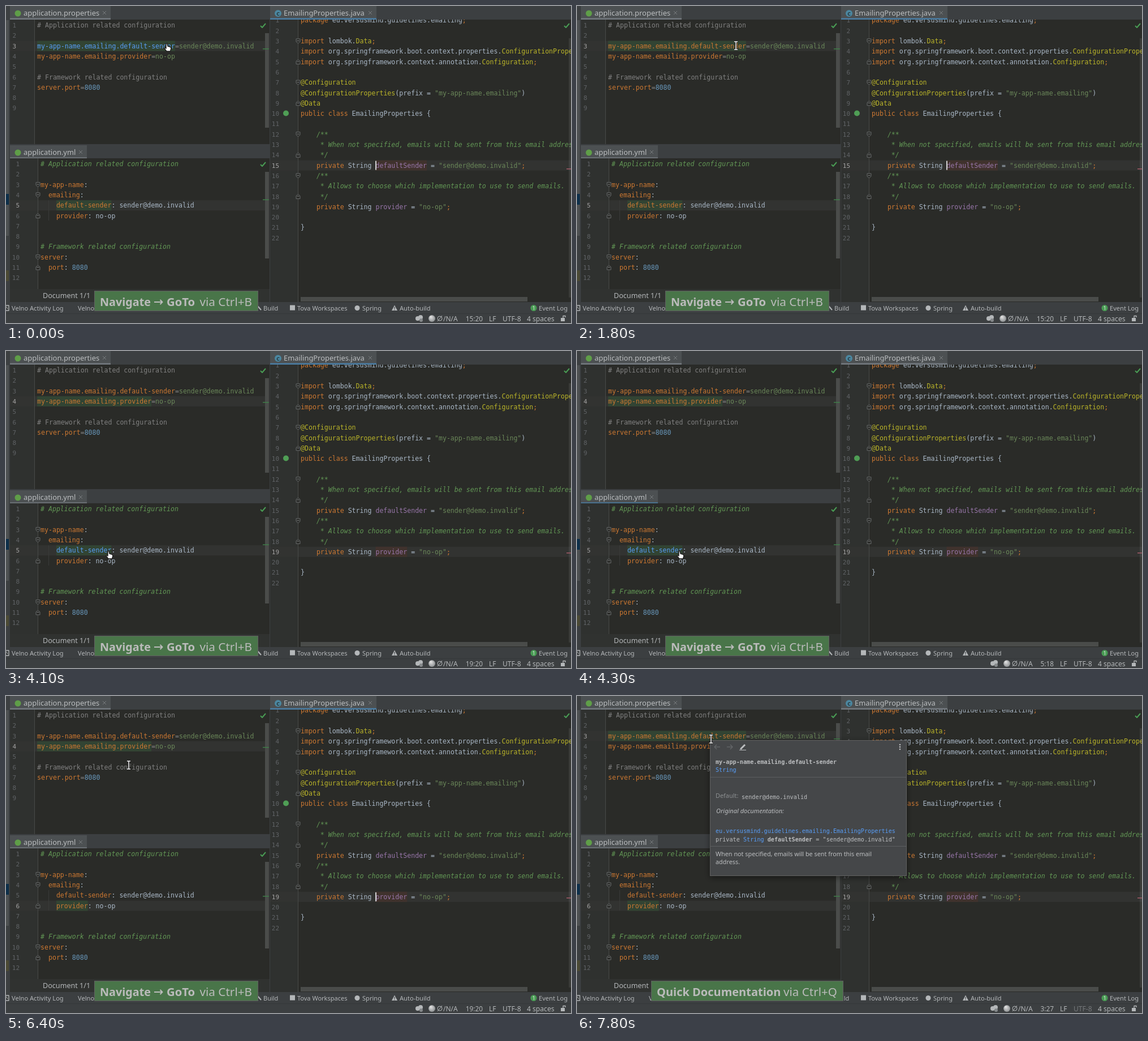
These frames come from a looping animation (999x560 px, 8 s). An HTML page with a canvas:

```html
<!DOCTYPE html>
<html lang="en">
<head>
<meta charset="utf-8">
<title>Navigating between configuration and code</title>
<style>
html, body { margin: 0; width: 100%; height: 100%; overflow: hidden; background: #3c3f41; }
canvas { display: block; width: 999px; height: 560px; }
</style>
</head>
<body>
<canvas id="stage" width="999" height="560"></canvas>
<script>
const ctx = document.getElementById('stage').getContext('2d');
const LOOP = 8000, CHAR = 6.97, ROW = 18.3;
const MONO = '"DejaVu Sans Mono", monospace', SANS = '"Noto Sans", "Open Sans", sans-serif';
const MAIL = 'sender@demo.invalid';
const COLORS = {
  o: '#cc7832', w: '#a9b7c6', c: '#808080', d: '#629755', s: '#6a8759',
  n: '#6897bb', f: '#9876aa', a: '#bbb529', l: '#589df6'
};

// Each line is a list of "color:text" runs joined by "~".
const panes = {
  top: {
    x: 55, y: 34, left: 7, right: 458, clip: [7, 24, 459, 220], gutter: 50, numbers: 18,
    lines: ['c:# Application related configuration', '',
      'o:my-app-name.emailing.default-sender~c:=~s:' + MAIL,
      'o:my-app-name.emailing.provider~c:=~s:no-op', '',
      'c:# Framework related configuration', 'o:server.port~c:=~n:8080', '', '']
  },
  yml: {
    x: 61, y: 279, left: 7, right: 458, clip: [7, 269, 459, 231], gutter: 56, numbers: 24,
    open: [3, 4, 10], close: [6, 11],
    lines: ['d:# Application related configuration', '', 'o:my-app-name~w::',
      'o:  emailing~w::', 'o:    default-sender~w:: ' + MAIL,
      'o:    provider~w:: no-op', '', '', 'd:# Framework related configuration',
      'o:server~w::', 'o:  port~w:: ~n:8080', '']
  },
  java: {
    x: 521, y: 25.4, left: 467, right: 999, clip: [467, 24, 532, 499], gutter: 516, numbers: 483,
    open: [3, 7, 12, 16], close: [5, 9, 14, 18],
    lines: ['o:package ~w:eu.versusmind.guidelines.emailing~o:;', '',
      'o:import ~w:lombok.~a:Data~o:;',
      'o:import ~w:org.springframework.boot.context.properties.~a:ConfigurationProperties~o:;',
      'o:import ~w:org.springframework.context.annotation.~a:Configuration~o:;', '',
      'a:@Configuration',
      'a:@ConfigurationProperties~w:(prefix = ~s:"my-app-name.emailing"~w:)',
      'a:@Data', 'o:public class ~w:EmailingProperties {', '',
      'd:    /**', 'd:     * When not specified, emails will be sent from this email address.', 'd:     */',
      'o:    private ~w:String ~f:defaultSender~w: = ~s:"' + MAIL + '"~o:;',
      'd:    /**', 'd:     * Allows to choose which implementation to use to send emails.', 'd:     */',
      'o:    private ~w:String ~f:provider~w: = ~s:"no-op"~o:;', '', 'w:}', '']
  }
};

// Pointer hot spot: time, x, y.
const POINTER = [
  [0, 284, 66], [400, 284, 66], [900, 283, 67], [1500, 283, 67], [1800, 281, 70], [2300, 281, 70],
  [2800, 225, 92], [3600, 225, 92], [4000, 181, 353], [4600, 181, 353], [5100, 116, 383],
  [5300, 116, 383], [5500, 116, 372], [6000, 116, 372], [6400, 217, 122], [6500, 228, 100],
  [6600, 228, 100], [6800, 237, 76], [8000, 237, 76]
];
const CARET_ON = [[0, 500], [1100, 1600], [1800, 2400], [3000, 3300], [3700, 4000],
  [4400, 4900], [5100, 5400], [6000, 6500]];
const TOP_LINK = [[0, 900], [1200, 1700]];

const during = (t, spans) => spans.some(([a, b]) => t >= a && t < b);
const latest = (t, steps) => steps.filter(([at]) => at <= t).pop()[1];
const smooth = u => u * u * (3 - 2 * u);

function pointerAt(t) {
  const i = POINTER.findIndex(k => k[0] > t);
  const [ta, xa, ya] = POINTER[i - 1], [tb, xb, yb] = POINTER[i];
  const u = smooth((t - ta) / (tb - ta));
  return [xa + (xb - xa) * u, ya + (yb - ya) * u];
}

function box(x, y, w, h, color) {
  ctx.fillStyle = color;
  ctx.fillRect(x, y, w, h);
}

function text(str, x, y, size, color, style = '', family = SANS, align = 'left') {
  ctx.font = `${style} ${size}px ${family}`;
  ctx.textAlign = align;
  ctx.fillStyle = color;
  ctx.fillText(str, x, y);
}

function path(points, stroke, width = 1, fill, close) {
  ctx.beginPath();
  points.forEach(([x, y]) => ctx.lineTo(x, y));
  if (close) ctx.closePath();
  if (fill) { ctx.fillStyle = fill; ctx.fill(); }
  if (stroke) { ctx.strokeStyle = stroke; ctx.lineWidth = width; ctx.stroke(); }
}

function disc(x, y, r, color) {
  ctx.beginPath();
  ctx.arc(x, y, r, 0, 7);
  ctx.fillStyle = color;
  ctx.fill();
}

const rowY = (pane, line) => pane.y + (line - 1) * ROW;

function codeLine(pane, line, linked) {
  let x = pane.x;
  for (const run of pane.lines[line - 1].split('~')) {
    const key = run[0], str = run.slice(2);
    const color = COLORS[linked && key === 'o' ? 'l' : key];
    text(str, x, rowY(pane, line) + 4, 11.58, color, key === 'd' ? 'italic' : '', MONO);
    x += str.length * CHAR;
  }
}

function foldMark(x, y, up) {
  const s = up ? -1 : 1;
  path([[x - 3.5, y - 4 * s], [x + 3.5, y - 4 * s], [x + 3.5, y + s], [x, y + 4 * s], [x - 3.5, y + s]],
    '#676a6a', 1, '#2a2b29', true);
  box(x - 2, y - 1, 4, 1, '#7b7e7e');
}

function drawPane(pane, current, mark, link) {
  const [cx, cy, cw, ch] = pane.clip;
  ctx.save();
  ctx.beginPath();
  ctx.rect(cx, cy, cw, ch);
  ctx.clip();
  box(cx, cy, cw, ch, '#2a2b28');
  box(cx, cy, pane.gutter - cx, ch, '#2f312f');
  box(pane.left, rowY(pane, current) - 9, pane.right - pane.left, 18, '#323331');
  box(pane.gutter, cy, 1, ch, '#484a48');
  const [line, col, length, color] = mark;
  box(pane.x + col * CHAR, rowY(pane, line) - 9, length * CHAR, 18, color);
  pane.lines.forEach((str, i) => {
    const n = i + 1;
    text(n, pane.numbers, rowY(pane, n) + 4, 11, n === current ? '#a4a3a3' : '#606366', '', MONO, 'right');
    if (str) codeLine(pane, n, link === n);
  });
  (pane.open || []).forEach(n => foldMark(pane.gutter + .5, rowY(pane, n)));
  (pane.close || []).forEach(n => foldMark(pane.gutter + .5, rowY(pane, n), true));
  ctx.restore();
}

function tab(x, y, w, label, focused, size = 13) {
  box(x, y, w, 24, '#4c5052');
  box(x, y + 21.5, w, 2.5, focused ? '#4a7ea5' : '#747a80');
  text(label, x + 24, y + 17, size, '#bbbec0');
  const cx = x + w - 11, cy = y + 12;
  path([[cx - 3, cy - 3], [cx + 3, cy + 3]], '#777b7d');
  path([[cx + 3, cy - 3], [cx - 3, cy + 3]], '#777b7d');
}

const tick = (x, y) => path([[x - 4, y], [x - 1, y + 3], [x + 5, y - 4]], '#499c54', 2);

function chrome(s) {
  box(0, 0, 999, 560, '#3c3f41');
  box(0, 25, 5, 381, '#4d5051');
  box(0, 332, 5, 19, '#0d2f4a');
  box(0, 467, 5, 19, '#4b4a34');
  tab(7, 0, 178, 'application.properties', s.focus === 'top');
  tab(7, 246, 136, 'application.yml', s.focus === 'yml', 12.9);
  tab(467, 0, 188, 'EmailingProperties.java', s.focus === 'java', 12.9);
  disc(21, 13, 5.5, '#5f9e48');
  disc(21, 259, 5.5, '#5f9e48');
  disc(481, 13, 6, '#4b87a0');
  text('C', 481, 16.5, 9, '#263238', 'bold', SANS, 'center');
}

function editors(s) {
  const green = '#324433';
  drawPane(panes.top, s.topLine, s.topMark === 3 ? [3, 0, 35, green] : [4, 0, 29, green], s.topLink);
  drawPane(panes.yml, s.ymlLine, s.ymlMark === 5 ? [5, 4, 14, green] : [6, 4, 8, green], s.ymlLink);
  drawPane(panes.java, s.javaLine, [s.javaMark, 19, s.javaMark === 15 ? 13 : 8, '#40322d'], 0);
  box(75, 343, 1, 36, '#393b39');
  disc(495, 189.5, 5, '#4f9e55');

  box(458, 48, 7, 167, '#4a4c4a');
  box(458, 293, 7, 153, '#4a4c4a');
  box(995, 57, 4, 458, 'rgba(255,255,255,.07)');
  box(521, 514, 401, 8, '#4a4c4a');
  box(454, s.topMark === 3 ? 75 : 90, 11, 1.5, '#3f7d48');
  box(454, s.ymlMark === 5 ? 341.5 : 353, 11, 1.5, '#3f7d48');
  box(991, s.javaMark === 15 ? 287 : 356, 8, 1.5, '#a45b68');
  tick(454, 35);
  tick(454, 280);
  tick(991, 35);
  if (s.caret) box(653, rowY(panes.java, s.javaLine) - 8, 2, 16, '#d0d0d0');
  if (s.focus === 'top' && s.t >= 7000) box(236, 63, 1.5, 16, '#c8c8c8');
}

function footer(s) {
  const ink = '#b4b7b9';
  box(7, 500, 459, 23, '#303230');
  box(0, 523, 999, 37, '#3c3f41');
  box(0, 543, 999, 1, '#343739');
  text('Document 1/1', 65, 516, 12.6, ink);
  text('Velno Activity Log', 10, 537.5, 11.1, ink);
  text('Velno', 127, 537.5, 11.1, ink);
  path([[0, 529], [5, 529], [5, 538], [0, 538]], ink, 1.3);
  path([[0, 531], [3, 535]], ink);
  path([[445, 530], [451, 537]], ink, 2);
  text('Build', 455, 537.5, 11, ink);
  box(502, 528.5, 9, 9, ink);
  text('Tova Workspaces', 515, 537.5, 11, ink);
  disc(621, 533.5, 4.5, ink);
  text('Spring', 630, 537.5, 11.1, ink);
  path([[687, 528.5], [692, 538], [682, 538]], null, 1, ink, true);
  box(686.4, 531.5, 1.2, 3.5, '#3c3f41');
  box(686.4, 536, 1.2, 1.2, '#3c3f41');
  text('Auto-build', 696, 537.5, 11.1, ink);
  disc(933, 533.5, 5.5, '#499c54');
  text('1', 933, 537, 9, '#eeeeee', '', SANS, 'center');
  text('Event Log', 942, 537.5, 11.1, ink);

  const shift = s.status.length < 5 ? 7 : 0;
  disc(728 + shift, 552, 4, ink);
  disc(733 + shift, 550, 4, ink);
  disc(734 + shift, 555, 3, '#85898b');
  const ball = ctx.createRadialGradient(751 + shift, 549, 1, 753 + shift, 552, 6);
  ball.addColorStop(0, '#dedede');
  ball.addColorStop(1, '#8f9294');
  disc(753 + shift, 552, 6, ball);
  ctx.beginPath();
  ctx.arc(767 + shift, 552, 4, 0, 7);
  ctx.strokeStyle = ink;
  ctx.lineWidth = 1;
  ctx.stroke();
  path([[763 + shift, 557], [771 + shift, 547]], ink);
  text('/N/A', 773 + shift, 556.5, 12, ink);
  text(s.status, 843, 556.5, 11.8, ink, '', SANS, 'right');
  text('LF', 854, 556.5, 12, ink);
  text('UTF-8', 878, 556.5, 12.1, s.focus === 'top' || s.doc ? '#777a7c' : ink);
  text('4 spaces', 921, 556.5, 12.1, ink);
  box(981, 551, 7, 6, ink);
  path([[985, 551], [985, 547.5], [989, 547.5], [989, 550]], ink, 1.3);
}

function banner(s) {
  const ink = '#bbbbbb', x = s.doc ? 131 : 156, w = s.doc ? 340 : 290;
  box(x, 503, w, 36, '#616161');
  box(x + 1, 504, w - 2, 34, '#497549');
  if (s.doc) {
    text('Quick Documentation', 141, 529.5, 20, ink, 'bold');
    text('via Ctrl+Q', 365, 529.5, 20.6, ink);
  } else {
    text('Navigate', 166, 529.5, 19.8, ink, 'bold');
    path([[262, 523], [277, 523]], ink, 2);
    path([[272.5, 519], [276.5, 523], [272.5, 527]], ink, 2);
    text('GoTo', 284, 529.5, 20.3, ink, 'bold');
    text('via Ctrl+B', 342.5, 529.5, 20.7, ink);
  }
}

function docPopup() {
  const ink = '#bcbec0', mono = (str, x, y, color, style) => text(str, x, y, 10.16, color, style, MONO);
  ctx.save();
  ctx.shadowColor = 'rgba(0,0,0,.45)';
  ctx.shadowBlur = 10;
  ctx.shadowOffsetY = 3;
  box(235, 78, 348, 240, '#616161');
  ctx.restore();
  box(236, 79, 346, 238, '#454749');
  path([[247, 86], [243, 90], [247, 94]], '#65686a', 1.3);
  path([[243, 90], [253, 90]], '#65686a', 1.3);
  path([[271, 86], [275, 90], [271, 94]], '#65686a', 1.3);
  path([[265, 90], [275, 90]], '#65686a', 1.3);
  path([[289, 94], [297, 86]], ink, 3);
  box(287, 95, 12, 1, ink);
  [86, 90, 94].forEach(y => disc(571, y, 1.3, ink));
  mono('my-app-name.emailing.default-sender', 245, 120, ink, 'bold');
  mono('String', 245, 134, COLORS.l);
  box(236, 143, 346, 1, '#5b5e60');
  text('Default:', 245, 179.5, 10.9, '#8c8f91');
  mono(MAIL, 291, 182, ink);
  text('Original documentation:', 246, 206.5, 11, ink, 'italic');
  mono('eu.versusmind.guidelines.emailing.EmailingProperties', 245, 242, COLORS.l);
  const step = 6.115;
  mono('private', 245, 256.5, ink);
  mono('String', 245 + 8 * step, 256.5, COLORS.l);
  mono('defaultSender', 245 + 15 * step, 256.5, ink, 'bold');
  mono('= "' + MAIL + '"', 245 + 29 * step, 256.5, ink);
  box(236, 265, 346, 1, '#5b5e60');
  text('When not specified, emails will be sent from this email', 245, 283, 10.83, ink);
  text('address.', 245, 297, 10.83, ink);
}

function handCursor(x, y) {
  ctx.lineJoin = 'round';
  path([[x - 1, y], [x + 1, y], [x + 2, y + 5], [x + 7, y + 6.5], [x + 8, y + 9], [x + 6.5, y + 14],
    [x, y + 14], [x - 4, y + 9], [x - 3, y + 7.5], [x - 1, y + 9]], '#202020', 1.5, '#ffffff', true);
}

function beamCursor(x, y) {
  for (const [color, width] of [['#202020', 3.5], ['#f4f4f4', 1.5]]) {
    path([[x - 3, y - 7], [x + 3, y - 7]], color, width);
    path([[x, y - 7], [x, y + 7]], color, width);
    path([[x - 3, y + 7], [x + 3, y + 7]], color, width);
  }
}

function stateAt(t) {
  const topLink = during(t, TOP_LINK) ? 3 : during(t, [[2700, 3000]]) ? 4 : 0;
  const ymlLink = during(t, [[4000, 4500]]) ? 5 : during(t, [[5500, 6100]]) ? 6 : 0;
  return {
    t, topLink, ymlLink,
    doc: t >= 7700,
    caret: during(t, CARET_ON),
    focus: latest(t, [[0, 'java'], [2800, 'top'], [3000, 'java'], [4200, 'yml'], [4400, 'java'],
      [5700, 'yml'], [6000, 'java'], [7000, 'top'], [7700, 'popup']]),
    status: latest(t, [[0, '15:20'], [2800, '4:25'], [3000, '19:20'], [4200, '5:18'], [4400, '15:20'],
      [5700, '6:9'], [6000, '19:20'], [7000, '3:27']]),
    topLine: latest(t, [[0, 3], [2800, 4], [7000, 3]]),
    topMark: latest(t, [[0, 3], [3300, 4], [7400, 3]]),
    ymlLine: latest(t, [[0, 5], [5700, 6]]),
    ymlMark: latest(t, [[0, 5], [6200, 6]]),
    javaLine: latest(t, [[0, 15], [3000, 19], [4400, 15], [6000, 19]]),
    javaMark: latest(t, [[0, 15], [3300, 19], [4700, 15], [6300, 19]])
  };
}

function draw(now) {
  const t = Math.floor(now % LOOP / 100) * 100;
  const s = stateAt(t);
  chrome(s);
  editors(s);
  footer(s);
  if (s.doc) docPopup();
  banner(s);
  const [x, y] = pointerAt(t);
  (s.topLink || s.ymlLink ? handCursor : beamCursor)(x, y);
}

const start = performance.now();
function animate() {
  draw(performance.now() - start);
  requestAnimationFrame(animate);
}
animate();
</script>
</body>
</html>
```
